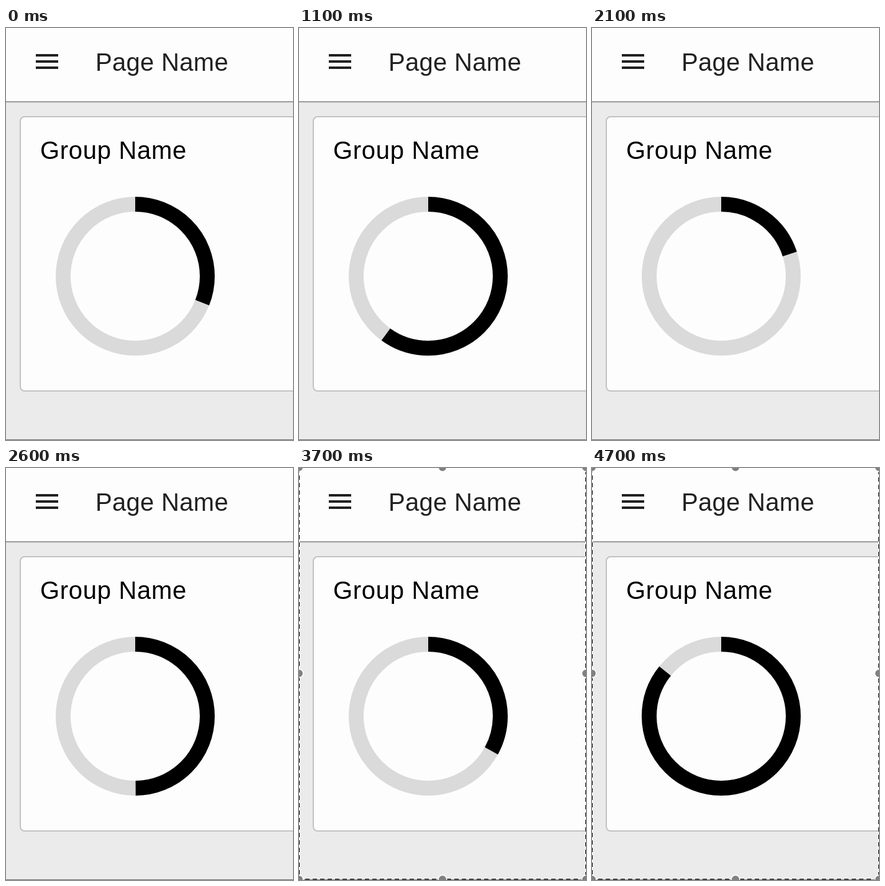
Recreate the animation shown at these times as an HTML page. Size 462 by 664 pixels, loop 5 s.

```html
<!DOCTYPE html>
<html lang="en">
<head>
<meta charset="utf-8">
<title>Progress ring</title>
<style>
  html, body { margin: 0; width: 100%; height: 100%; overflow: hidden; background: #ebebeb; }
  svg { display: block; }
  text { font: 40px "Liberation Sans", Arial, sans-serif; font-kerning: none; }
  .ring { fill: none; stroke-width: 24; }
</style>
</head>
<body>
<svg width="462" height="664" viewBox="0 0 462 664">
  <rect width="462" height="664" fill="#ebebeb"/>

  <!-- header -->
  <rect width="462" height="118" fill="#fdfdfd"/>
  <rect y="118" width="462" height="1" fill="#8c8c8c"/>
  <rect y="119" width="462" height="1" fill="#b0b0b0"/>
  <rect y="120" width="462" height="1" fill="#dedede"/>
  <path d="M48 44H84M48 54H84M48 64H84" stroke="#212121" stroke-width="4"/>
  <text x="144" y="69" fill="#212121" letter-spacing=".3">Page Name</text>

  <!-- card -->
  <rect x="23" y="143" width="500" height="442" rx="7" fill="#fdfdfd" stroke="#c2c2c2" stroke-width="2"/>
  <text x="55" y="211" letter-spacing=".7">Group Name</text>
  <circle class="ring" cx="208" cy="400" r="116" stroke="#dadada"/>
  <circle class="ring" id="arc" cx="208" cy="400" r="116" stroke="#000"
    pathLength="100" transform="rotate(-90 208 400)"/>
  <rect y="663" width="462" height="1" fill="#6a6a6a"/>

  <g id="selection">
    <g fill="none">
      <path d="M.5 0V662.5H461.5V0" stroke="#fff"/>
      <path d="M.5 0V662.5H461.5V0" stroke="#000" stroke-dasharray="7 5"/>
    </g>
    <g id="handles" fill="#808080" stroke="#fff" stroke-width="1.5"></g>
  </g>
</svg>
<script>
  const LOOP = 5000, STEP = 100, EASE_MS = 250, SELECT_AT = 2900;
  const START_VALUE = 31;
  // [start time in ms, new percentage]
  const updates = [[460, 60], [1494, 20], [2454, 62], [3455, 33], [4475, 86]];

  const byId = id => document.getElementById(id);
  const arc = byId('arc'), selection = byId('selection');

  byId('handles').innerHTML = [0, 231, 462].flatMap(x => [-1, 331, 663].map(y =>
    x === 231 && y === 331 ? '' : `<circle cx="${x}" cy="${y}" r="6.75"/>`)).join('');

  const cubicInOut = t => t < .5 ? 4 * t ** 3 : 1 - 4 * (1 - t) ** 3;

  function percentAt(time) {
    let value = START_VALUE;
    for (const [start, next] of updates) {
      const t = Math.min(1, Math.max(0, (time - start) / EASE_MS));
      value += (next - value) * cubicInOut(t);
    }
    return value;
  }

  function draw(now) {
    const time = Math.floor(now % LOOP / STEP) * STEP;
    arc.setAttribute('stroke-dasharray', `${percentAt(time)} 100`);
    selection.style.display = time < SELECT_AT ? 'none' : '';
  }

  function tick() {
    draw(performance.now());
    requestAnimationFrame(tick);
  }
  tick();
</script>
</body>
</html>
```
